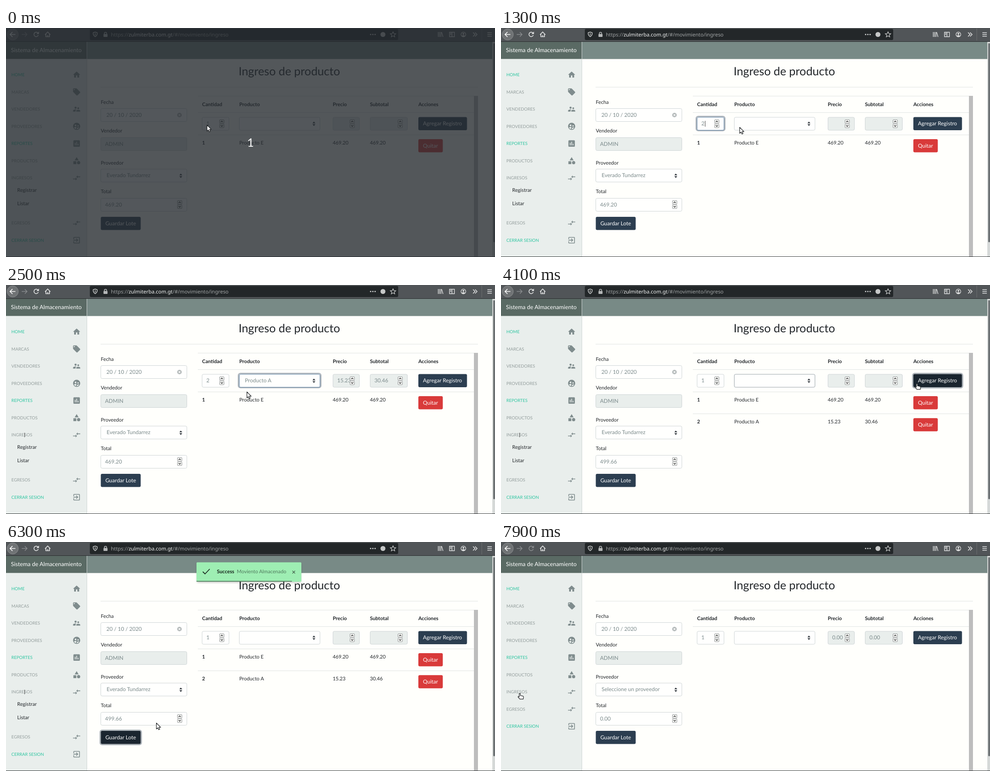
Write an HTML page that moves like this. It is 1091 by 513 pixels and loops after 8 s.

```html
<!DOCTYPE html>
<html lang="es">
<head>
<meta charset="utf-8">
<title>Ingreso de producto</title>
<style>
html, body { margin: 0; width: 100%; height: 100%; overflow: hidden; background: #fffffc; }
svg { display: block; width: 1091px; height: 513px; font-family: Lato, sans-serif; }
text { white-space: pre; text-rendering: geometricPrecision; }
.ui { font-family: "Noto Sans", sans-serif; }
</style>
</head>
<body>
<svg id="stage" viewBox="0 0 1091 513"></svg>
<script>
const LOOP = 8000, STEP = 100;
const HOST = 'zulmiterba.com.gt';
const NAVY = '#2c3e50', DARK = '#1a252f', GREY = '#7b8a8b', INK = '#212529';
const LINE = '#dfe3e2', BORDER = '#ced4d6', MUTED = '#e9eeec', GREEN = '#2cc5a0';

// Cursor stops: time, x, y
const PATH = [
  [0, 448, 217], [400, 448, 217], [700, 456, 217], [1000, 456, 217], [1300, 532, 222],
  [1500, 537, 222], [1700, 537, 222], [2100, 537, 239], [2600, 537, 239],
  [3000, 740, 400], [3100, 735, 383], [3300, 735, 383], [3800, 928, 221], [4200, 928, 221],
  [4500, 510, 387], [4700, 510, 387], [5200, 250, 447], [5800, 250, 447], [6300, 335, 405],
  [6700, 250, 362], [7100, 144, 337], [7600, 74, 385], [7900, 42, 339]
];
// Sidebar text caret: visible spans
const BLINK = [[2000, 2700], [3100, 3500], [4100, 4800], [5500, 5900], [6300, 6800]];

const ICONS = {
  home: 'M10 20v-6h4v6h5v-8h3L12 3 2 12h3v8z',
  tag: 'M21.4 11.6l-9-9Q11.8 2 11 2H4Q2 2 2 4v7q0 .8.6 1.4l9 9q1.4 1.2 2.8 0l7-7q1.2-1.4 0-2.8zM5.5 7a1.5 1.5 0 1 1 0-3 1.5 1.5 0 0 1 0 3z',
  people: 'M16.5 12a2.5 2.5 0 1 0 0-5 2.5 2.5 0 0 0 0 5zM9 11a3 3 0 1 0 0-6 3 3 0 0 0 0 6zM16.5 14c-1.8 0-5.5.9-5.5 2.8V19h11v-2.2c0-1.9-3.7-2.8-5.5-2.8zM9 13c-2.3 0-7 1.2-7 3.5V19h7v-2.2c0-.9.3-2.4 2.4-3.5Q10 13 9 13z',
  group: 'M12 2a10 10 0 1 0 0 20 10 10 0 0 0 0-20zM9 7a2.4 2.4 0 1 1 0 4.8A2.4 2.4 0 0 1 9 7zM16 9a1.9 1.9 0 1 1 0 3.8A1.9 1.9 0 0 1 16 9zM4.5 15.5q4-3 7.5-1.5-2 1.500-2 6-4-1-5.500-4.500zM12 20q0-5.500 7-5-1.500 4.500-7 5z',
  chart: 'M19 3H5Q3 3 3 5v14q0 2 2 2h14q2 0 2-2V5q0-2-2-2zM9 17H7v-7h2zM13 17h-2V7h2zM17 17h-2v-4h2z',
  shapes: 'M12 2l-5.5 9h11zM3 13.500h8v8H3zM17.500 13a4.500 4.500 0 1 0 0 9 4.500 4.500 0 0 0 0-9z',
  arrows: 'M9 14H2v2h7v3l4-4-4-4zM15 13v-3h7V8h-7V5l-4 4z',
  exit: 'M10.100 15.600L11.500 17l5-5-5-5-1.400 1.400L12.700 11H3v2h9.700zM19 3H5Q3 3 3 5v4h2V5h14v14H5v-4H3v4q0 2 2 2h14q2 0 2-2V5q0-2-2-2z'
};
const MENU = [
  ['HOME', 'home', 1], ['MARCAS', 'tag'], ['VENDEDORES', 'people'], ['PROVEEDORES', 'group'],
  ['REPORTES', 'chart', 1], ['PRODUCTOS', 'shapes'], ['INGRESOS', 'arrows'],
  ['EGRESOS', 'arrows'], ['CERRAR SESION', 'exit', 1]
];

const rect = (x, y, w, h, fill, more = '') =>
  `<rect x="${x}" y="${y}" width="${w}" height="${h}" fill="${fill}" ${more}/>`;
const text = (x, y, s, size, fill, more = '') =>
  `<text x="${x}" y="${y}" font-size="${size}" fill="${fill}" ${more}>${s}</text>`;
const shape = (d, fill, more = '') => `<path d="${d}" fill="${fill}" ${more}/>`;
const stroke = (d, color, w = 1.5, more = '') =>
  shape(d, 'none', `stroke="${color}" stroke-width="${w}" ${more}`);
const disc = (x, y, r, fill, more = '') => `<circle cx="${x}" cy="${y}" r="${r}" fill="${fill}" ${more}/>`;
const at = (x, y, body, scale = 1) => `<g transform="translate(${x} ${y}) scale(${scale})">${body}</g>`;
const ring = (x, y, w, h) =>
  rect(x - 1.5, y - 1.5, w + 3, h + 3, 'none', 'rx="4.5" stroke="#2c3e50" stroke-opacity=".4" stroke-width="2.6"');

function field(x, y, w, value, o = {}) {
  const edge = o.focus ? '#597ea2' : o.edge || BORDER;
  return (o.focus ? ring(x, y, w, 29) : '') +
    rect(x + .5, y + .5, w - 1, 29, o.off ? MUTED : '#fffffe', `rx="3" stroke="${edge}"`) +
    text(x + (o.pad || 10), y + 18.5, value, 12, GREY);
}
const spinner = (x, y) => [0, 9.5].map((dy, i) =>
  rect(x + .5, y + dy + .5, 10, 8.5, '#f4f5f3', 'rx="1.500" stroke="#96999a"') +
  stroke(i ? `M${x + 3} ${y + 13}l2.500 2.500 2.500-2.500` : `M${x + 3} ${y + 6}l2.500-2.500 2.500 2.500`, '#333', 1.3)).join('');
const picker = (x, y) => shape(`M${x - 3.2} ${y - 1}l3.200-4 3.200 4zM${x - 3.2} ${y + 1}l3.200 4 3.200-4z`, '#343a40');
const button = (x, y, w, label, fill, focus) =>
  (focus ? ring(x, y, w, 29.5) : '') + rect(x, y, w, 29.5, fill, 'rx="3"') +
  text(x + 10.2, y + 18.7, label, 12, '#fff');

function cursorPos(t) {
  const i = PATH.findIndex(p => p[0] > t);
  if (i < 0) return PATH[PATH.length - 1].slice(1);
  const [t0, x0, y0] = PATH[i - 1], [t1, x1, y1] = PATH[i], k = (t - t0) / (t1 - t0);
  return [x0 + (x1 - x0) * k, y0 + (y1 - y0) * k];
}

function cursor(kind, x, y) {
  const edge = 'stroke="#1c1f21" stroke-width="1.2" stroke-linejoin="round"';
  if (kind === 'beam') return at(x, y, stroke('M-3-6h6M0-6v12M-3 6h6', '#222', 1.2));
  if (kind === 'hand') return at(x, y,
    shape('M-1.300 1c0-1.500 2.500-1.500 2.500 0v4l5.500 1.200q1.600.4 1.500 2l-.6 4.600H0l-3.700-4.300c-.8-1.200.6-2.200 1.500-1.300l.9.900z', '#fff', edge));
  return at(x, y, shape('M.5.500V14l3.100-2.800 2 4.400 2.400-1.100-2-4.300h4.100z', '#fff', edge));
}

function toolbar(loading, stale) {
  const w = '#e4e5e5', dim = '#898c8e', reload = stale ? dim : w;
  return rect(0, 0, 1091, 30, '#515558') + rect(0, 30, 1091, 1, '#282b2d') +
    disc(15, 14.5, 12.5, '#707375', 'stroke="#8c8f90"') +
    stroke('M21 14.500H9.500M14.500 9l-5.500 5.500 5.500 5.500', '#fff', 1.7) +
    stroke('M35 14.500h12M42 9.500l5 5-5 5', dim) +
    (loading ? stroke('M62 9.500l10 10M72 9.500l-10 10', w, 1.7)
      : stroke('M71.500 11.500a5 5 0 1 0 .6 4.500', reload, 1.7) + shape('M73.500 8v5.500H68z', reload)) +
    stroke('M87 15l6-6 6 6M89 14v5.500h8V14M93 19.500V16', w, 1.7) +
    rect(187, 2, 688, 25, '#232729', 'rx="3"') +
    stroke('M194.500 10.500l4.500-1.500 4.500 1.500q.5 6-4.500 9-5-3-4.500-9zM199 11.500v5', '#c6c8c8', 1.5) +
    rect(217.500, 13.500, 9, 6.500, '#b5b7b8', 'rx="1"') +
    stroke('M219.500 14v-2a2.500 2.500 0 0 1 5 0v2', '#b5b7b8', 1.6) +
    `<text class="ui" x="234" y="18.500" font-size="11.450" fill="#a1a4a5">https://<tspan fill="#f4f5f5">${HOST}</tspan>/#/movimiento/ingreso</text>` +
    [813.5, 818.5, 823.5].map(x => disc(x, 14.500, 1.6, '#c6c8c8')).join('') +
    disc(841, 14.500, 5.5, '#c6c8c8') +
    stroke('M863.500 8.500l1.800 4 4.300.4-3.300 2.900 1 4.200-3.800-2.200-3.800 2.200 1-4.200-3.300-2.900 4.300-.4z', '#c6c8c8', 1.3) +
    stroke('M964.500 9v11M967.500 9v11M970.500 9v11M972 9.500l3 10.500', w, 1.4) +
    stroke('M989.500 9.500h11v10h-11zM995 9.500v10M991 12h2.500M991 14.500h2.500', w, 1.4) +
    disc(1020.500, 14.500, 5.3, 'none', `stroke="${w}" stroke-width="1.300"`) +
    disc(1020.500, 13, 2, w) + shape('M1016.800 17.500q3.700-3 7.400 0-3.700 3.500-7.400 0z', w) +
    stroke('M1042 10l4.500 4.500-4.500 4.500M1046.500 10l4.500 4.500-4.500 4.500', w, 1.6) +
    rect(1061, 1, 1, 27, '#6b6e70') + stroke('M1074 10.500h10M1074 14.500h10M1074 18.500h10', w, 1.6);
}

function sidebar(open, caret) {
  let s = rect(0, 31, 1091, 38.500, '#788a86') + rect(0, 31, 180, 38.500, '#5a6a64') +
    text(11, 54.2, 'Sistema de Almacenamiento', 12.8, '#fff') +
    rect(0, 69.500, 180, 443, MUTED) + rect(180, 31, 1, 481, '#cfd6d4');
  MENU.forEach(([label, icon, on], i) => {
    const y = 104.7 + 38.52 * i + (open && i > 6 ? 62.5 : 0);
    s += text(12, y + 3.5, label, 9.6, on ? GREEN : '#939d9c') +
      at(148, y - 9.6, shape(ICONS[icon], '#7f8c8d', 'fill-rule="evenodd"'), .8);
  });
  if (open) s += text(25, 367.3, 'Registrar', 11.2, INK) + text(25, 397, 'Listar', 11.2, INK);
  if (caret) s += rect(41, 331, 1, 10, '#444');
  return s;
}

function form(t, focus, fresh, hoverSave) {
  const total = fresh ? '0.00' : t < 4000 ? '469.20' : '499.66';
  return text(519, 105.500, 'Ingreso de producto', 25.7, INK) + rect(211, 132, 842, 1, LINE) +
    [['Fecha', 170], ['Vendedor', 234], ['Proveedor', 305.5], ['Total', 369.5]]
      .map(([s, y]) => text(211.5, y, s, 11.2, INK)).join('') +
    field(211, 180, 193, '20 / 10 / 2020', { pad: 13 }) +
    disc(387, 195, 5, '#b3b9b9') + stroke('M385 193l4 4M389 193l-4 4', '#fff', 1.2) +
    field(211, 245, 193, 'ADMIN', { off: 1 }) +
    field(211, 315.500, 193, fresh ? 'Seleccione un proveedor' : 'Everado Tundarrez', { pad: 13.5 }) +
    picker(390, 331) +
    field(211, 381, 193, total) + spinner(382, 386) +
    button(211.500, 423, 89, 'Guardar Lote', focus === 'save' || hoverSave ? DARK : NAVY, focus === 'save');
}

function table(t, focus, fresh, hoverAdd) {
  const typed = t >= 1200 && t < 4000, chosen = t >= 2500 && t < 4000;
  const qty = t >= 1100 && t < 1200 ? '' : typed ? '2' : '1';
  const rows = fresh ? [] : [['1', 'Producto E', '469.20', '469.20'], ['2', 'Producto A', '15.23', '30.46']].slice(0, t < 4000 ? 1 : 2);
  const cols = [437.5, 520.5, 729, 812, 920];
  const bold = 'font-weight="700"';
  let s = rect(428, 152, 616, 1, LINE) + rect(428, 189, 616, 1, LINE) +
    ['Cantidad', 'Producto', 'Precio', 'Subtotal', 'Acciones']
      .map((h, i) => text(cols[i], 174.700, h, 11.2, INK, bold)).join('') +
    field(437, 199.500, 61, qty, { focus: focus === 'qty' }) + spinner(476, 205) +
    field(520, 199.500, 181, chosen ? 'Producto A' : '',
      { focus: focus === 'prod', pad: 13, edge: t >= 4000 && t < 4200 ? '#97a1a8' : '' }) + picker(687, 214.500) +
    field(729, 199.500, 60, chosen ? '15.23' : fresh ? '0.00' : '', { off: 1 }) + spinner(767, 205) +
    field(812, 199.500, 84, chosen ? '30.46' : fresh ? '0.00' : '', { off: 1 }) + spinner(874, 205) +
    button(920, 199.500, 108.500, 'Agregar Registro', focus === 'add' || hoverAdd ? DARK : NAVY, focus === 'add');
  if (focus === 'qty' && t >= 600) s += rect(qty ? 455 : 447, 208, 1, 13, '#444');
  rows.forEach((row, r) => {
    const y = 239 + r * 49.3;
    s += rect(428, Math.floor(y), 616, 1, LINE) +
      row.map((v, i) => text(cols[i], y + 21.700, v, 11.2, INK, i ? '' : bold)).join('') +
      button(920, y + 10, 54.500, 'Quitar', '#d93a3a');
  });
  return s + rect(1044, 152, 9, 360, '#bdbdbd');
}

function options(active) {
  let s = rect(520.5, 230.5, 180, 283, '#fffffe', 'stroke="#b9c0c1"');
  [...'ABCDEFGHIJKL'].forEach((c, i) => {
    if (active && !i) s += rect(521, 231, 179, 23.500, '#dfe4e5');
    s += text(533, 247 + i * 23.5, 'Producto ' + c, 12, GREY);
  });
  return s;
}

function toast(t) {
  const left = 234 * (1 - (t - 5850) / 5000);
  return `<g opacity="${Math.min(1, (t - 5800) / 200)}">` +
    rect(426, 48, 232, 43, '#000', 'opacity=".22" rx="3" style="filter:blur(2px)"') +
    rect(425, 45.500, 234, 43.500, '#9eeeb3', 'rx="2"') + rect(425, 87, left, 2, '#5f8a6b') +
    stroke('M439 66.500l5 5 10.500-11', '#1d2b22', 1.8) +
    text(470.5, 70, 'Success', 11.2, '#16241b', 'font-weight="700"') +
    text(515, 70, 'Moviento Almacenado', 11.2, '#4f7a5d') +
    stroke('M639 64.500l6 6M645 64.500l-6 6', '#3f5a48', 1.1) + '</g>';
}

function scene(t) {
  const [x, y] = cursorPos(t);
  const over = (l, top, r, b) => x >= l && x <= r && y >= top && y <= b;
  const focus = t < 400 ? '' : t < 1700 ? 'qty' : t < 4000 ? 'prod' : t < 5500 ? 'add' : t < 6800 ? 'save' : '';
  const fresh = t >= 7500, blank = t >= 6900 && !fresh, loading = t >= 6800 && t < 7700;
  const hoverAdd = over(920, 199, 1028, 229), hoverSave = over(211, 423, 300, 452);
  const hoverMenu = fresh && over(0, 325, 85, 350);
  const kind = hoverAdd || hoverSave || hoverMenu ? 'hand' : t >= 400 && over(437, 199, 497, 229) ? 'beam' : 'arrow';

  let s = rect(0, 0, 1091, 513, '#fffffc');
  if (!blank) {
    s += sidebar(!fresh, BLINK.some(([a, b]) => t >= a && t < b)) +
      form(t, focus, fresh, hoverSave) + table(t, focus, fresh, hoverAdd) +
      rect(1085, 31, 6, 481, '#d5d8d7') + rect(1087, 34, 4, 446, '#6d7274', 'rx="2"');
  }
  if (t >= 1700 && t < 2500) s += options(t >= 2000);
  if (t >= 5900 && t < 6900) s += toast(t);
  s += toolbar(loading, t >= 7700);
  if (loading && !fresh) {
    s += rect(-2, 492, 260, 22, '#2a2e2f', 'rx="2"') +
      text(2, 507, `Esperando a ${HOST}…`, 10.8, '#f0f1f1', 'class="ui"');
  }
  s += rect(0, 512, 1091, 1, '#2a2d2f');
  if (t < 100) {
    s += rect(0, 0, 1091, 513, '#262a30', 'opacity=".79"') +
      text(545.5, 265.5, '1', 26, '#fff', 'text-anchor="middle"');
  }
  return s + cursor(kind, x, y);
}

const stage = document.getElementById('stage');
const start = performance.now();
let shown = -1;
function tick() {
  const t = Math.floor(((performance.now() - start) % LOOP) / STEP) * STEP;
  if (t !== shown) stage.innerHTML = scene(shown = t);
  requestAnimationFrame(tick);
}
tick();
</script>
</body>
</html>
```
